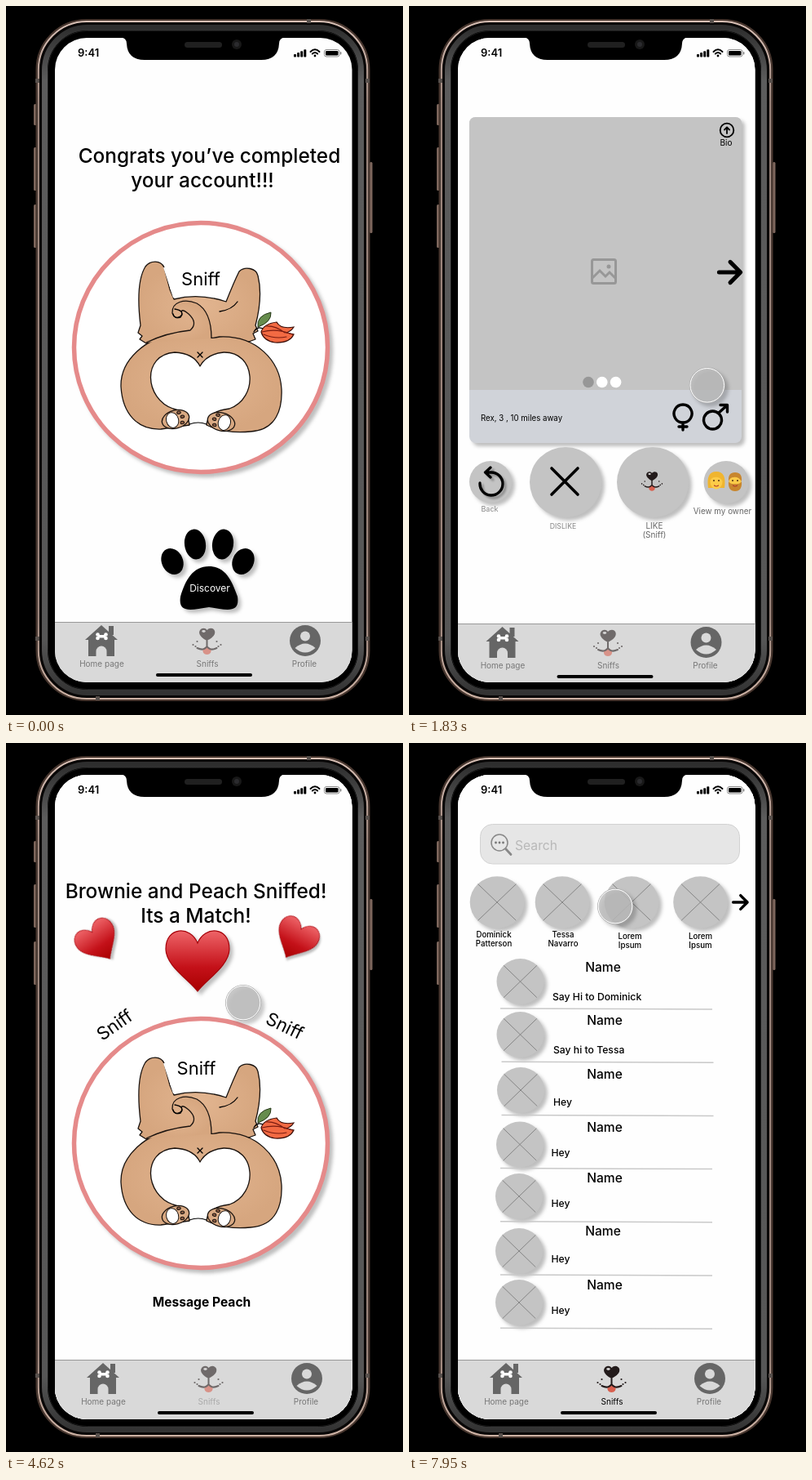
An HTML page that plays this animation: 487 px wide and 868 px high, repeating every 8 s.

```html
<!DOCTYPE html>
<html lang="en">
<head>
<meta charset="utf-8">
<title>Dog dating app prototype</title>
<style>
html, body { margin: 0; width: 100%; height: 100%; overflow: hidden; background: #000; }
svg { display: block; width: 100vw; height: 100vh; font-family: Inter, "Liberation Sans", sans-serif; }
.shadow { filter: drop-shadow(4px 4px 2px rgba(0, 0, 0, .25)); }
.line { fill: none; stroke: #000; stroke-linecap: round; stroke-linejoin: round; }
</style>
</head>
<body>
<svg viewBox="0 0 487 868">
  <defs>
    <clipPath id="glass"><rect x="60" y="39" width="364.5" height="789" rx="39"/></clipPath>
    <linearGradient id="red" x2="0" y2="1"><stop stop-color="#ee6468"/><stop offset=".6" stop-color="#c41119"/><stop offset="1" stop-color="#a80000"/></linearGradient>
    <linearGradient id="rim" x2="0" y2="1"><stop stop-color="#d9c0b5"/><stop offset=".12" stop-color="#a18a80"/><stop offset=".88" stop-color="#a18a80"/><stop offset="1" stop-color="#cdb2a4"/></linearGradient>
    <linearGradient id="steel" x2="0" y2="1"><stop stop-color="#2e2e2e"/><stop offset=".08" stop-color="#5c5c5c"/><stop offset=".92" stop-color="#565656"/><stop offset="1" stop-color="#333"/></linearGradient>
    <radialGradient id="fur"><stop stop-color="#e2b590"/><stop offset="1" stop-color="#d6a67f"/></radialGradient>
  </defs>
  <g id="phone"></g>
  <g id="screens" clip-path="url(#glass)"></g>
  <g id="status"></g>
  <g id="cursor" class="shadow">
    <circle r="21.5" fill="#bcbcbc" fill-opacity=".82" stroke="#aaa" stroke-width="1"/>
    <circle r="20.8" fill="none" stroke="#fff" stroke-width="1"/>
  </g>
</svg>
<script>
const $ = id => document.getElementById(id);
const text = (x, y, s, size, more = '') => `<text x="${x}" y="${y}" font-size="${size}" ${more}>${s}</text>`;
const mid = (x, y, s, size, more = '') => text(x, y, s, size, 'text-anchor="middle" ' + more);
const rect = (x, y, w, h, r, more = '') => `<rect x="${x}" y="${y}" width="${w}" height="${h}" rx="${r}" ${more}/>`;
const oval = (x, y, rx, ry, more = '') => `<ellipse cx="${x}" cy="${y}" rx="${rx}" ry="${ry}" ${more}/>`;
const dot = (x, y, r, more) => oval(x, y, r, r, more);
const path = (d, more = '') => `<path d="${d}" ${more}/>`;
const line = (d, w, more = '') => path(d, `class="line" stroke-width="${w}" ${more}`);
const group = (move, body, more = '') => `<g transform="${move}" ${more}>${body}</g>`;
const at = (x, y, body, more) => group(`translate(${x} ${y})`, body, more);
const MEDIUM = 'font-weight="500"';

function phone() {
  const side = [[34, 120, 26], [34, 173, 53], [34, 243, 53], [446, 191, 87]]
    .map(([x, y, h]) => rect(x, y, 3.5, h, 1.5, 'fill="#7d665c"')).join('');
  const ticks = [[36, 89], [36, 772], [441, 89], [441, 772], [369, 16], [110, 845]]
    .map(([x, y]) => rect(x, y, 5, 5, 0, 'fill="#57504c"')).join('');
  return side +
    rect(37.5, 17, 408, 833, 61, 'fill="#080606" stroke="#49372f" stroke-width="2"') +
    rect(39.8, 19, 403.4, 829, 59, 'fill="none" stroke="url(#rim)" stroke-width="2.2"') + ticks +
    rect(47.5, 26.5, 388, 814, 52, 'fill="#000" stroke="url(#steel)" stroke-width="7"') +
    rect(51.5, 30.5, 380, 806, 48, 'fill="#000" stroke="#181818" stroke-width="1"');
}

function status() {
  const bars = [0, 1, 2, 3].map(i => rect(353 + i * 4.1, 59 - i * 1.9, 3, 3.6 + i * 1.9, .8)).join('');
  return path('M140 38 Q148 39 148 46 Q149 66 170 66 H313 Q334 66 335 46 Q335 39 343 38Z') +
    rect(219, 44, 46, 7, 3.5, 'fill="#202020"') +
    dot(283, 47, 6, 'fill="#181818"') + dot(283, 47, 3, 'fill="#2b2b2e"') +
    text(88, 62, '9:41', 13, 'font-weight="600"') + bars +
    line('M373.5 56 Q379 50.5 384.5 56 M375.8 58.5 Q379 55.5 382.2 58.5', 1.9) + dot(379, 61, 1.4) +
    rect(390.5, 53.5, 18.5, 8.5, 2.5, 'fill="none" stroke="#888"') + rect(392, 55, 15.5, 5.5, 1.3) +
    rect(410, 56, 1.4, 3.5, .7, 'fill="#888"');
}

// Dog muzzle, centred on the mouth
const snout = () =>
  path('M0 -1 C-6 -4 -11 -9 -9 -13 C-7 -17 -2 -17 0 -14 C3 -17 8 -17 9.5 -13 C11 -8 6 -4 0 -1Z', 'fill="#231b1b"') +
  oval(-4, -12.5, 2.2, 1.4, 'fill="#fff" opacity=".8"') +
  path('M-5 9 Q0 4 5 9 Q6 16 0 16 Q-6 16 -5 9Z', 'fill="#d8604f"') +
  line('M0 -1 V6 Q-4 12 -12 8 M0 6 Q4 12 12 8', 2, 'style="stroke:#231b1b"') +
  [[17, 4], [12, 0], [14, 6]].map(([x, y]) => dot(-x, y, 1.1, 'fill="#231b1b"') + dot(x, y, 1.1, 'fill="#231b1b"')).join('');

function tabs(dx, dy, active, label = '#777') {
  const grey = 'fill="#777"', bg = 'fill="#d9d9d9"';
  const home = path('M117 758 L137 776 H133 V796 H101 V776 H97Z M126 759 h6 v11 h-6Z', 'fill="#666"') +
    path('M110.5 797 V790 a6.5 6.5 0 0 1 13 0 V797Z', bg) +
    path('M113 771.8 h9', 'stroke="#fff" stroke-width="3.5"') +
    [[112.5, 769.5], [112.5, 774], [122.5, 769.5], [122.5, 774]].map(([x, y]) => dot(x, y, 2.3, 'fill="#fff"')).join('');
  const profile = dot(367, 777, 19, 'fill="#666"') + dot(367, 771.5, 6, bg) +
    path('M354.5 786 Q367 775 379.5 786 Q367 797 354.5 786Z', bg);
  return at(dx, dy, rect(50, 754.5, 390, 90, 0, bg + ' stroke="#999"') +
    home + at(246.5, 778, snout(), active ? '' : 'opacity=".58"') + profile +
    mid(117.5, 809, 'Home page', 10, grey) + mid(247, 809, 'Sniffs', 10, `fill="${active ? '#000' : label}"`) +
    mid(366, 809, 'Profile', 10, grey) + rect(184, 817, 118, 4, 2));
}

function dog() {
  const fur = 'fill="url(#fur)" stroke="#19120e" stroke-width="1.3" stroke-linejoin="round"';
  const foot = group('translate(208 506) rotate(-15)',
    oval(0, 0, 17, 11, fur) + oval(-4, 0, 7.5, 9.5, 'fill="#fff" stroke="#19120e"') +
    [[6, -7], [9, -1], [7, 6]].map(([a, b]) => oval(a, b, 2.3, 1.7, 'fill="#8f5f46" stroke="#19120e"')).join(''));
  return oval(239, 418, 155.5, 152.5, 'fill="#fff" stroke="#e58a8a" stroke-width="5.5" class="shadow"') +
    path('M172 413 L164 408 L167 404 L162 400 L165 391 C161 358 163 332 171 319 C177 311 190 311 194 320 L201 347 L206 359 Q237 351 270 362 C276 347 281 335 286 325 C293 318 307 321 309 330 C314 350 311 372 306 391 L309 398 L303 401 L306 408 L298 411 L255 420 L205 416Z', fur) +
    path('M194 320 Q198 332 206 357', 'fill="none" stroke="#fff" stroke-width="2"') +
    path('M202 404 C174 406 140 432 141 466 C143 500 162 519 190 518 L225 513 Q224 498 205 493 C170 481 166 427 207 424 Q230 425 238 441 Q246 426 267 424 C307 423 310 480 274 493 Q247 496 246 513 Q269 524 300 521 C332 519 339 493 338 469 C336 434 307 403 262 405 Q240 410 233 398 Q220 398 202 404Z', fur) +
    line('M225 512 Q236 508 246 512', 1.2) +
    foot + group('translate(472 3) scale(-1 1)', foot) +
    path('M172 412 Q197 400 226 397 Q236 388 224 377 Q213 368 216 378 Q208 386 204 376 C203 362 219 358 234 364 Q252 374 252 407', fur) +
    line('M205 377 Q206 383 214 381 Q220 373 207 371 M262 374 Q277 372 284 362 M235 424 l6 6 m0 -6 l-6 6', 1.3) +
    line('M304 399 Q309 390 318 397', 1.3) +
    path('M309 393 Q307 379 325 375 Q326 387 309 393Z', 'fill="#668c4d" stroke="#243617"') +
    path('M313 399 Q316 389 332 387 Q337 396 353 393 Q350 398 344 400 L353 402 Q348 413 330 412 Q316 410 313 399Z', 'fill="#f26a43" stroke="#3a0d08" stroke-width="1.2"') +
    line('M314 399 Q332 394 351 402 M319 392 Q330 391 342 400 M316 402 Q330 408 344 405', 1.1, 'style="stroke:#7a1b10"');
}

const button = (x, y, rx, ry) => oval(x, y, rx, ry, 'fill="#c4c4c4" class="shadow"');
const arrow = (x, y, k) => group(`translate(${x} ${y}) scale(${k})`, line('M-12 0 H12 M1 -12 L13 0 L1 12', 4.8));

function welcome() {
  const toes = [[204, 680, -25, 16.5], [232, 659, -8, 18.5], [266, 659, 8, 18.5], [291, 680, 25, 16.5]]
    .map(([x, y, a, r]) => oval(x, y, 13, r, `transform="rotate(${a} ${x} ${y})"`)).join('');
  return mid(249.5, 192, 'Congrats you’ve completed', 24.4, MEDIUM) + mid(241, 222, 'your account!!!', 24.4, MEDIUM) +
    dog() + mid(239, 342, 'Sniff', 22) +
    `<g class="shadow">${toes}${path('M249 686 C269 686 277 703 284 723 C287 743 273 740 249 736 C225 740 211 743 214 723 C220 703 229 686 249 686Z')}</g>` +
    mid(250, 717, 'Discover', 12, 'fill="#fff"') + tabs(0, 0);
}

function face(x, man) {
  const hair = `fill="${man ? '#c8862d' : '#f0b52f'}"`;
  return at(x, 582, (man ? '' : path('M-10 8 Q-13 -12 0 -12 Q13 -12 10 8Z', hair)) +
    oval(0, 0, 7.5, 9.5, 'fill="#fccb48"') +
    path('M-8 0 Q-9 -11 0 -11 Q9 -11 8 0 Q4 -6 -2 -5 Q-6 -5 -8 0Z', hair) +
    (man ? path('M-8 0 Q-5 4 0 3 Q5 4 8 0 Q9 12 0 12 Q-9 12 -8 0Z', hair) : '') +
    dot(-3, -1, 1, 'fill="#553214"') + dot(3, -1, 1, 'fill="#553214"') +
    line('M-2.5 5 Q0 7 2.5 5', 1.2, 'style="stroke:#b0352b"'));
}

function browse() {
  const grey = 'fill="#858585"', dark = 'fill="#666"';
  return `<g class="shadow">${rect(74, 136, 334, 399, 8, 'fill="#d0d3d9"')}${path('M74 470 V144 q0 -8 8 -8 H400 q8 0 8 8 V470Z', 'fill="#c4c4c4"')}</g>` +
    dot(390, 152, 8.3, 'class="line" stroke-width="1.8"') + line('M390 156 V149 M387 151.5 L390 148.5 L393 151.5', 1.8) +
    mid(389, 171, 'Bio', 10) +
    `<g fill="none" stroke="#979797" stroke-width="3">${rect(224.5, 310.5, 29, 29, 2)}${path('M225 333 L234 324 L241 331 L246 326 L253 333')}</g>` +
    dot(245, 319, 2.5, 'fill="#979797"') + arrow(393, 326, 1.05) +
    ['#979797', '#fff', '#fff'].map((c, i) => dot(220 + i * 16.8, 460.5, 6.8, `fill="${c}"`)).join('') +
    text(88, 508, 'Rex, 3 , 10 miles away', 9.7) +
    line('M336 510 V519 M331 515 H341 M336 510 a11 11 0 1 1 .1 0 M380 498 L390 489 M382 488.5 H390.5 V497', 3.4) +
    dot(372.5, 507, 11, 'class="line" stroke-width="3.4"') +
    button(100, 582.5, 26, 25.5) + button(192, 583, 44, 43) + button(299, 583, 44, 43) + button(389, 583, 27.5, 26) +
    line('M87 584 A14 14 0 1 0 101 571 H94 M100 565 L93.5 571 L100 577', 3.3, 'filter="drop-shadow(3px 3px 1px #0004)"') +
    line('M175 566 L207 598 M207 566 L175 598', 3.6) +
    group('translate(298 582) scale(.73)', snout()) + face(377, false) + face(400, true) +
    mid(99, 619, 'Back', 9, grey) + mid(189, 640, 'DISLIKE', 8.7, grey) +
    mid(301, 640, 'LIKE', 10, dark) + mid(301, 651, '(Sniff)', 10, dark) +
    mid(384.5, 622, 'View my owner', 9.85, dark) + tabs(-2.5, 2);
}

function match() {
  const heart = (x, y, turn, k) => group(`translate(${x} ${y}) rotate(${turn}) scale(${k})`,
    path('M0 37 C-10 23 -39 6 -39 -15 C-39 -42 -9 -44 0 -22 C9 -44 39 -42 39 -15 C39 6 10 23 0 37Z', 'fill="url(#red)" stroke="#a50008" stroke-width="1.2"'), 'class="shadow"');
  const tilted = (x, y, a) => group(`translate(${x} ${y}) rotate(${a})`, mid(0, 8, 'Sniff', 22));
  return mid(233, 190, 'Brownie and Peach Sniffed!', 24.4, MEDIUM) + mid(233, 220, 'Its a Match!', 24.4, MEDIUM) +
    heart(235, 267, 0, 1) + heart(114, 244, -34, .66) + heart(355, 241, 28, .66) +
    at(0, 72, dog()) + mid(233.5, 406, 'Sniff', 22) + tilted(133, 345, -35) + tilted(342, 346, 26) +
    mid(240, 690, 'Message Peach', 15.6, 'font-weight="700"') + tabs(2, 1, false, '#aaa');
}

function inbox() {
  const photo = (x, y, rx, ry) => button(x, y, rx, ry) +
    path(`M${x - rx * .7} ${y - ry * .7} l${rx * 1.4} ${ry * 1.4} m0 ${-ry * 1.4} l${-rx * 1.4} ${ry * 1.4}`, 'fill="none" stroke="#858585" stroke-width="1"');
  const people = [[108, 104, 238, 'Dominick', 'Patterson'], [188, 189, 238, 'Tessa', 'Navarro'],
    [273, 271, 240, 'Lorem', 'Ipsum'], [357.5, 357.5, 240, 'Lorem', 'Ipsum']]
    .map(([x, tx, y, a, b]) => photo(x, 195, 33.3, 31.7) + mid(tx, y, a, 9.7, MEDIUM) + mid(tx, y + 11, b, 9.7, MEDIUM)).join('');
  // Photo x, photo y, name x, name y, message x, message y, message
  const rows = [[136.5, 292, 238, 280, 176, 315, 'Say Hi to Dominick'], [136.5, 357, 240, 345, 177, 380, 'Say hi to Tessa'],
    [137, 425, 240, 411, 177, 444], [136, 491.5, 240, 476, 174.5, 506], [135, 555, 240, 538, 174.5, 568],
    [135, 622, 238, 603, 174.5, 636], [135, 685, 240, 669, 174.5, 699]]
    .map(([x, y, nx, ny, mx, my, s = 'Hey'], i) => {
      const left = i == 1 || i == 2 ? 113.5 : 112;
      return photo(x, y, 29, 28) + mid(nx, ny, 'Name', 15.6, MEDIUM) + text(mx, my, s, 12.2, MEDIUM) +
        path(`M${left} ${325 + i * 65.2} l260 1`, 'stroke="#c9c9c9" stroke-width="1.5"');
    }).join('');
  return rect(87.5, 99.5, 318, 48.5, 15, 'fill="#e6e6e6" stroke="#d2d2d2"') +
    dot(111, 122, 10, 'fill="none" stroke="#888" stroke-width="1.5"') + line('M119 130 L125 136.5', 2.8, 'style="stroke:#888"') +
    [106.5, 111, 115.5].map(x => dot(x, 122, 1.4, 'fill="#777"')).join('') +
    text(130, 131, 'Search', 15.7, 'fill="#b8b8b8"') + people + arrow(406, 195, .7) + rows + tabs(2, 1, true);
}

$('phone').innerHTML = phone();
$('status').innerHTML = status();
$('screens').innerHTML = [welcome, browse, match, inbox]
  .map(draw => `<g>${rect(55, 35, 375, 800, 0, 'fill="#fefefe"')}${draw()}</g>`).join('');

const LOOP = 8000;
const fades = [[-2, -1], [640, 720], [4500, 4580], [6650, 6900]];
const presses = [[530, 680], [3480, 3560], [4480, 4540], [6640, 6720]];
// Pointer stops: time, x, y
const stops = [[70, 351, 825], [370, 247, 720], [990, 247, 720], [1220, 277, 664], [1400, 375, 470], [1530, 412, 359],
  [1830, 366, 464], [2150, 277, 555], [2550, 310, 588], [3780, 310, 588], [4080, 317, 460], [4390, 291, 318],
  [5020, 291, 318], [5240, 250, 520], [5400, 147, 380], [5530, 230, 222], [5660, 367, 250], [5780, 269, 323],
  [5860, 284, 420], [6160, 184, 600], [6490, 287, 691], [7420, 287, 691], [7690, 390, 420], [7950, 253, 200], [8000, 253, 200]];

// Slope of one coordinate at a stop; zero where it turns or rests
function slope(k, c) {
  const p = stops[k - 1], s = stops[k], q = stops[k + 1];
  if (!p || !q || (s[c] - p[c]) * (q[c] - s[c]) <= 0) return 0;
  return (q[c] - p[c]) / (q[0] - p[0]);
}

function pointer(t) {
  const i = stops.findIndex(s => s[0] > t);
  const a = stops[i - 1], b = stops[i];
  const d = b[0] - a[0], u = (t - a[0]) / d, v = 1 - u;
  return [1, 2].map(c => a[c] * v * v * (1 + 2 * u) + b[c] * u * u * (3 - 2 * u) +
    d * u * v * (slope(i - 1, c) * v - slope(i, c) * u));
}

function frame(now) {
  const t = now % LOOP;
  [...$('screens').children].forEach((s, i) => {
    const [from, to] = fades[i];
    const p = t <= from ? 0 : t >= to ? 1 : (t - from) / (to - from);
    s.style.opacity = p;
    s.style.display = p ? '' : 'none';
  });
  const cursor = $('cursor');
  cursor.style.display = t < 70 ? 'none' : '';
  if (t >= 70) {
    cursor.setAttribute('transform', `translate(${pointer(t)})`);
    const pressed = presses.some(([a, b]) => t >= a && t < b);
    cursor.firstElementChild.setAttribute('fill', pressed ? '#adadad' : '#bcbcbc');
  }
  requestAnimationFrame(frame);
}
requestAnimationFrame(frame);
</script>
</body>
</html>
```
